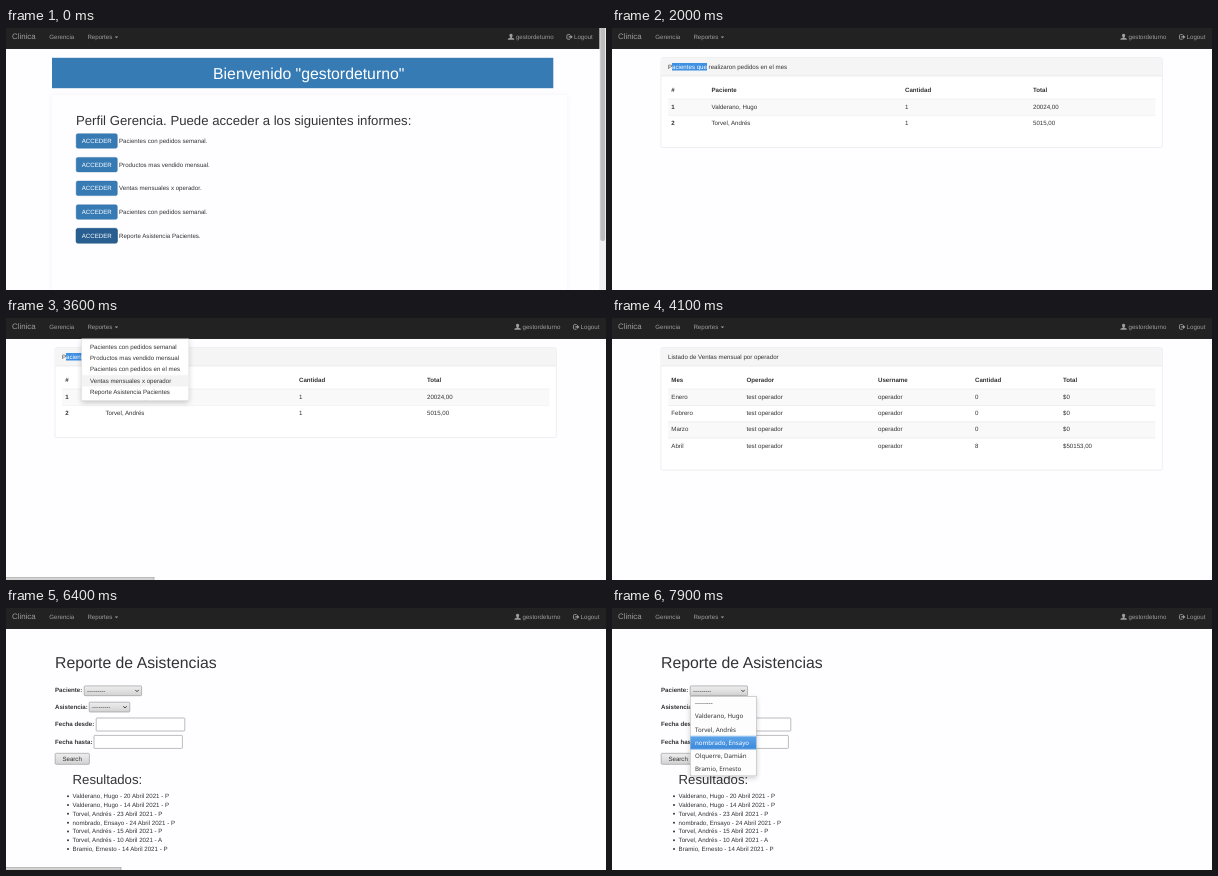
Animation, 600 px wide and 262 px high, one loop 8000 ms. Source, as an HTML page:

```html
<!DOCTYPE html>
<html lang="es">
<head>
<meta charset="utf-8">
<title>Clinica</title>
<style>
html, body { margin: 0; width: 100%; height: 100%; overflow: hidden; background: #fefdff; }
svg { display: block; width: 100%; height: 100%; }
text { font: 6.15px "Liberation Sans", Arial, sans-serif; fill: #333; text-rendering: geometricPrecision; white-space: pre; }
.h1 { font-size: 15.81px; }
.h2 { font-size: 13.18px; }
.b { font-weight: bold; }
.w, .w text { fill: #fff; }
.nav text { fill: #9d9d9d; }
.nav .brand { font-size: 7.9px; }
.icon { fill: #9d9d9d; }
.popup text { font-family: "Noto Sans", "Open Sans", sans-serif; }
.panel { fill: #fff; stroke: #ddd; stroke-width: .5; }
.line { stroke: #ddd; stroke-width: .45; fill: none; }
.field { stroke: #8f8f8f; stroke-width: .6; }

/* Shared 8 s clock; every change is a hard step. */
.a { animation: 8s step-end -10ms infinite; }
.p1 { animation-name: p1; }
.p2 { animation-name: p2; }
.p3 { animation-name: p3; }
.p4 { animation-name: p4; }
.right { animation-name: right; }
.press { animation-name: press; }
.reports { animation-name: reports; }
.menu { animation-name: menu; }
.item { animation-name: item; }
.status { animation-name: status; }
.sel1 { animation-name: sel1; }
.sel2 { animation-name: sel2; }
.popup { animation-name: popup; }
.option { animation-name: option; }

@keyframes p1 { 0% { opacity: 1 } 13.75%, to { opacity: 0 } }
@keyframes p2 { 0% { opacity: 0 } 13.75% { opacity: 1 } 48.75%, to { opacity: 0 } }
@keyframes p3 { 0% { opacity: 0 } 48.75% { opacity: 1 } 80%, to { opacity: 0 } }
@keyframes p4 { 0% { opacity: 0 } 80%, to { opacity: 1 } }
@keyframes right { 0% { transform: none } 13.75%, to { transform: translateX(6.6px) } }
@keyframes press {
  0% { transform: translateY(94.8px) }
  1.25% { transform: translateY(71.1px) }
  2.5% { transform: translateY(47.4px) }
  3.75% { transform: translateY(23.7px) }
  5% { transform: none }
  6.25% { transform: translateY(23.7px) }
  7.5%, to { transform: translateY(47.4px) }
}
@keyframes reports {
  0%, 40%, 72.5%, to { fill: #9d9d9d }
  36.25%, 66.25% { fill: #fff }
}
@keyframes menu {
  0%, 46.25%, 76.25%, to { opacity: 0 }
  37.5%, 71.25% { opacity: 1 }
}
@keyframes item {
  0%, 46.25%, 76.25%, to { transform: translateY(-100px) }
  40%, 72.5% { transform: none }
  41.25% { transform: translateY(11.42px) }
  42.5%, 73.75% { transform: translateY(22.84px) }
  43.75% { transform: translateY(34.26px) }
  75% { transform: translateY(45.68px) }
}
@keyframes status {
  0%, 13.75%, 51.25%, 82.5%, to { width: 0 }
  10%, 75% { width: 116px }
  36.25%, 66.25% { width: 152px }
  40%, 72.5% { width: 149px }
}
@keyframes sel1 {
  0% { width: 0 }
  25% { width: 35px }
  26.25% { width: 68px }
  27.5% { width: 99px }
  28.75%, to { width: 115px }
}
@keyframes sel2 {
  0% { width: 0 }
  58.75% { width: 19px }
  60% { width: 48px }
  61.25% { width: 78px }
  62.5% { width: 101px }
  63.75%, to { width: 113.5px }
}
@keyframes popup { 0% { opacity: 0 } 88.75%, to { opacity: 1 } }
@keyframes option {
  0% { transform: none }
  90% { transform: translateY(13.2px) }
  92.5% { transform: translateY(26.4px) }
  93.75% { transform: translateY(39.6px) }
  95% { transform: translateY(52.8px) }
  96.25% { transform: translateY(66px) }
  97.5% { transform: translateY(52.8px) }
  98.75%, to { transform: translateY(39.6px) }
}
</style>
</head>
<body>
<svg viewBox="0 0 600 262">
  <defs>
    <linearGradient id="grey" x2="0" y2="1"><stop stop-color="#eee"/><stop offset="1" stop-color="#d2d2d2"/></linearGradient>
    <linearGradient id="blue" x2="0" y2="1"><stop stop-color="#5fa5ea"/><stop offset="1" stop-color="#3a88da"/></linearGradient>
    <filter id="soft" x="-20%" y="-20%" width="140%" height="150%"><feDropShadow dx="0" dy="2" stdDeviation="2.4" flood-opacity=".2"/></filter>
    <filter id="faint"><feDropShadow dx="0" dy="0" stdDeviation="2" flood-opacity=".05"/></filter>
    <clipPath id="clip1"><rect class="a sel1" x="60" y="35" width="0" height="7.4"/></clipPath>
    <clipPath id="clip2"><rect class="a sel2" x="56" y="35" width="0" height="7.4"/></clipPath>
    <rect id="btn" x="70.2" y="105.7" width="41.1" height="14.5" rx="1.7" stroke-width=".45"/>
    <text id="enter" class="w" x="75.7" y="114.9">ACCEDER</text>
    <path id="arrow" d="M-1.7-.9 0 .9 1.7-.9" fill="none" stroke="#333" stroke-width=".9"/>
  </defs>

  <rect width="600" height="262" fill="#fefdff"/>

  <g class="a p1">
    <rect x="46" y="67" width="515" height="210" fill="#fefdff" filter="url(#faint)"/>
    <rect x="46" y="29.8" width="501.3" height="30.4" fill="#377bb5"/>
    <text class="h1 w" x="302.7" y="51" text-anchor="middle">Bienvenido "gestordeturno"</text>
    <text class="h2" x="70" y="96.6">Perfil Gerencia. Puede acceder a los siguientes informes:</text>
    <g fill="#377bb5" stroke="#2e6da4">
      <use href="#btn"/><use href="#btn" y="23.7"/><use href="#btn" y="47.4"/><use href="#btn" y="71.1"/><use href="#btn" y="94.8"/>
    </g>
    <g class="a press" fill="#285f90" stroke="#204d74"><use href="#btn"/></g>
    <use href="#enter"/><use href="#enter" y="23.7"/><use href="#enter" y="47.4"/><use href="#enter" y="71.1"/><use href="#enter" y="94.8"/>
    <text y="114.9"><tspan x="113">Pacientes con pedidos semanal.</tspan><tspan x="113" dy="23.7">Productos mas vendido mensual.</tspan><tspan x="113" dy="23.7">Ventas mensuales x operador.</tspan><tspan x="113" dy="23.7">Pacientes con pedidos semanal.</tspan><tspan x="113" dy="23.7">Reporte Asistencia Pacientes.</tspan></text>
  </g>

  <g class="a p2">
    <rect class="panel" x="49" y="29.7" width="501.3" height="89.9" rx="1.7"/>
    <path d="M49.3 48V31.4q0-1.4 1.4-1.4h497.9q1.4 0 1.4 1.4V48z" fill="#f5f5f5"/>
    <path class="line" d="M49 48h501.3M56 87.5h487.4"/>
    <path d="M56 71.5h487.4v16H56z" fill="#f9f9f9"/>
    <path class="line" d="M56 71.1h487.4" stroke-width=".88"/>
    <text x="56" y="40.6">Pacientes que realizaron pedidos en el mes</text>
    <g clip-path="url(#clip1)" class="w">
      <rect x="56" y="35" width="120" height="8" fill="#3f8fe2"/>
      <text x="56" y="40.6">Pacientes que realizaron pedidos en el mes</text>
    </g>
    <text class="b" y="64.2"><tspan x="59.3">#</tspan><tspan x="99.5">Paciente</tspan><tspan x="293">Cantidad</tspan><tspan x="421">Total</tspan></text>
    <text y="80.9"><tspan class="b" x="59.3">1</tspan><tspan x="99.5">Valderano, Hugo</tspan><tspan x="293">1</tspan><tspan x="421">20024,00</tspan></text>
    <text y="97.1"><tspan class="b" x="59.3">2</tspan><tspan x="99.5">Torvel, Andrés</tspan><tspan x="293">1</tspan><tspan x="421">5015,00</tspan></text>
  </g>

  <g class="a p3">
    <rect class="panel" x="49" y="29.7" width="501.3" height="122.4" rx="1.7"/>
    <path d="M49.3 48V31.4q0-1.4 1.4-1.4h497.9q1.4 0 1.4 1.4V48z" fill="#f5f5f5"/>
    <path d="M56 71.5h487.4v16H56zM56 104h487.4v16H56z" fill="#f9f9f9"/>
    <path class="line" d="M49 48h501.3M56 87.5h487.4M56 103.8h487.4M56 120h487.4"/>
    <path class="line" d="M56 71.1h487.4" stroke-width=".88"/>
    <text x="56" y="40.6">Listado de Ventas mensual por operador</text>
    <g clip-path="url(#clip2)" class="w">
      <rect x="56" y="35" width="120" height="8" fill="#3f8fe2"/>
      <text x="56" y="40.6">Listado de Ventas mensual por operador</text>
    </g>
    <text class="b" y="64.2"><tspan x="59.3">Mes</tspan><tspan x="134.5">Operador</tspan><tspan x="266">Username</tspan><tspan x="363">Cantidad</tspan><tspan x="451">Total</tspan></text>
    <text y="80.9"><tspan x="59.3">Enero</tspan><tspan x="134.5">test operador</tspan><tspan x="266">operador</tspan><tspan x="363">0</tspan><tspan x="451">$0</tspan></text>
    <text y="97.1"><tspan x="59.3">Febrero</tspan><tspan x="134.5">test operador</tspan><tspan x="266">operador</tspan><tspan x="363">0</tspan><tspan x="451">$0</tspan></text>
    <text y="113.4"><tspan x="59.3">Marzo</tspan><tspan x="134.5">test operador</tspan><tspan x="266">operador</tspan><tspan x="363">0</tspan><tspan x="451">$0</tspan></text>
    <text y="129.6"><tspan x="59.3">Abril</tspan><tspan x="134.5">test operador</tspan><tspan x="266">operador</tspan><tspan x="363">8</tspan><tspan x="451">$50153,00</tspan></text>
  </g>

  <g class="a p4">
    <text class="h1" x="49" y="60.2">Reporte de Asistencias</text>
    <text class="b"><tspan x="49" y="84.4">Paciente:</tspan><tspan x="49" y="100.9">Asistencia:</tspan><tspan x="49" y="118.3">Fecha desde:</tspan><tspan x="49" y="135.8">Fecha hasta:</tspan></text>
    <g class="field" fill="url(#grey)">
      <rect x="78.2" y="77.9" width="57.4" height="9.8" rx="1"/>
      <rect x="83.2" y="94.2" width="40.6" height="9.8" rx="1"/>
      <rect x="49.2" y="145.3" width="34.2" height="11" rx="1"/>
    </g>
    <g class="field" fill="#fff">
      <rect x="90.2" y="110" width="88.6" height="13" rx=".8"/>
      <rect x="88" y="127.4" width="88.4" height="13" rx=".8"/>
    </g>
    <use href="#arrow" x="131" y="82.8"/><use href="#arrow" x="119" y="99.1"/>
    <text><tspan x="81" y="84.6">---------</tspan><tspan x="86" y="100.9">---------</tspan><tspan x="56.4" y="152.9">Search</tspan></text>
    <text class="h2" x="66.6" y="175.6">Resultados:</text>
    <path d="M62 188.3v53.4" stroke="#333" stroke-width="2" stroke-linecap="round" stroke-dasharray="0 8.78"/>
    <text y="190.2"><tspan x="66.6">Valderano, Hugo - 20 Abril 2021 - P</tspan><tspan x="66.6" dy="8.78">Valderano, Hugo - 14 Abril 2021 - P</tspan><tspan x="66.6" dy="8.78">Torvel, Andrés - 23 Abril 2021 - P</tspan><tspan x="66.6" dy="8.78">nombrado, Ensayo - 24 Abril 2021 - P</tspan><tspan x="66.6" dy="8.78">Torvel, Andrés - 15 Abril 2021 - P</tspan><tspan x="66.6" dy="8.78">Torvel, Andrés - 10 Abril 2021 - A</tspan><tspan x="66.6" dy="8.78">Bramio, Ernesto - 14 Abril 2021 - P</tspan></text>
    <g class="a popup">
      <rect x="78.2" y="88.5" width="66.2" height="79.4" fill="#fdfdfd" stroke="#aaa" stroke-width=".5" filter="url(#soft)"/>
      <rect class="a option" x="78.4" y="88.5" width="65.8" height="13.2" fill="url(#blue)"/>
      <text y="97.2"><tspan x="83">---------</tspan><tspan x="83" dy="13.2">Valderano, Hugo</tspan><tspan x="83" dy="13.2">Torvel, Andrés</tspan><tspan x="83" dy="13.2" class="w">nombrado, Ensayo</tspan><tspan x="83" dy="13.2">Olquerre, Damián</tspan><tspan x="83" dy="13.2">Bramio, Ernesto</tspan></text>
    </g>
  </g>

  <g class="nav">
    <rect width="600" height="20.9" fill="#222"/>
    <path d="M0 20.7h600" stroke="#080808" stroke-width=".45"/>
    <text class="brand" x="6" y="11.4">Clinica</text>
    <text x="43.3" y="11.1">Gerencia</text>
    <g class="a reports" fill="#9d9d9d">
      <text x="81.4" y="11.1" style="fill: inherit">Reportes</text>
      <path d="M108.7 8.5h3.5l-1.75 1.76z"/>
    </g>
    <g class="a right">
      <path class="icon" d="M505 5.7c1.1 0 1.7.8 1.6 1.9-.1.8-.4 1.3-.7 1.6v.5l2 .9q.4.2.4 1.2h-6.5q0-1 .4-1.2l2-.9v-.5c-.4-.3-.7-.8-.8-1.6-.1-1.1.5-1.9 1.6-1.9z"/>
      <path d="M564 6.6h-2.2q-.9 0-.9.9v2.8q0 .9.9.9h2.2" fill="none" stroke="#9d9d9d" stroke-width=".9"/>
      <path class="icon" d="M562.7 8.2h1.7V6.7l2.4 2.2-2.4 2.2V9.6h-1.7z"/>
      <text x="509.9" y="11.1">gestordeturno</text>
      <text x="568" y="11.1">Logout</text>
    </g>
  </g>

  <g class="a p1">
    <rect x="593.4" width="6.6" height="262" fill="#f0f0f0"/>
    <rect x="594.3" y="-4" width="4.8" height="217" rx="2" fill="#bdbdbd"/>
  </g>

  <g class="a menu">
    <path d="M75.6 20.8h107.2v60q0 1.7-1.7 1.7H77.3q-1.7 0-1.7-1.7z" fill="#fff" stroke="#ccc" stroke-width=".4" filter="url(#soft)"/>
    <rect class="a item" x="75.9" y="22.8" width="106.6" height="11.42" fill="#f3f3f3"/>
    <text y="30.5"><tspan x="84">Pacientes con pedidos semanal</tspan><tspan x="84" dy="11.42">Productos mas vendido mensual</tspan><tspan x="84" dy="11.42">Pacientes con pedidos en el mes</tspan><tspan x="84" dy="11.42">Ventas mensuales x operador</tspan><tspan x="84" dy="11.42">Reporte Asistencia Pacientes</tspan></text>
  </g>

  <rect class="a status" x="-1" y="259.6" width="0" height="6" fill="#d2d2d2" stroke="#999" stroke-width=".6"/>
</svg>
</body>
</html>
```
